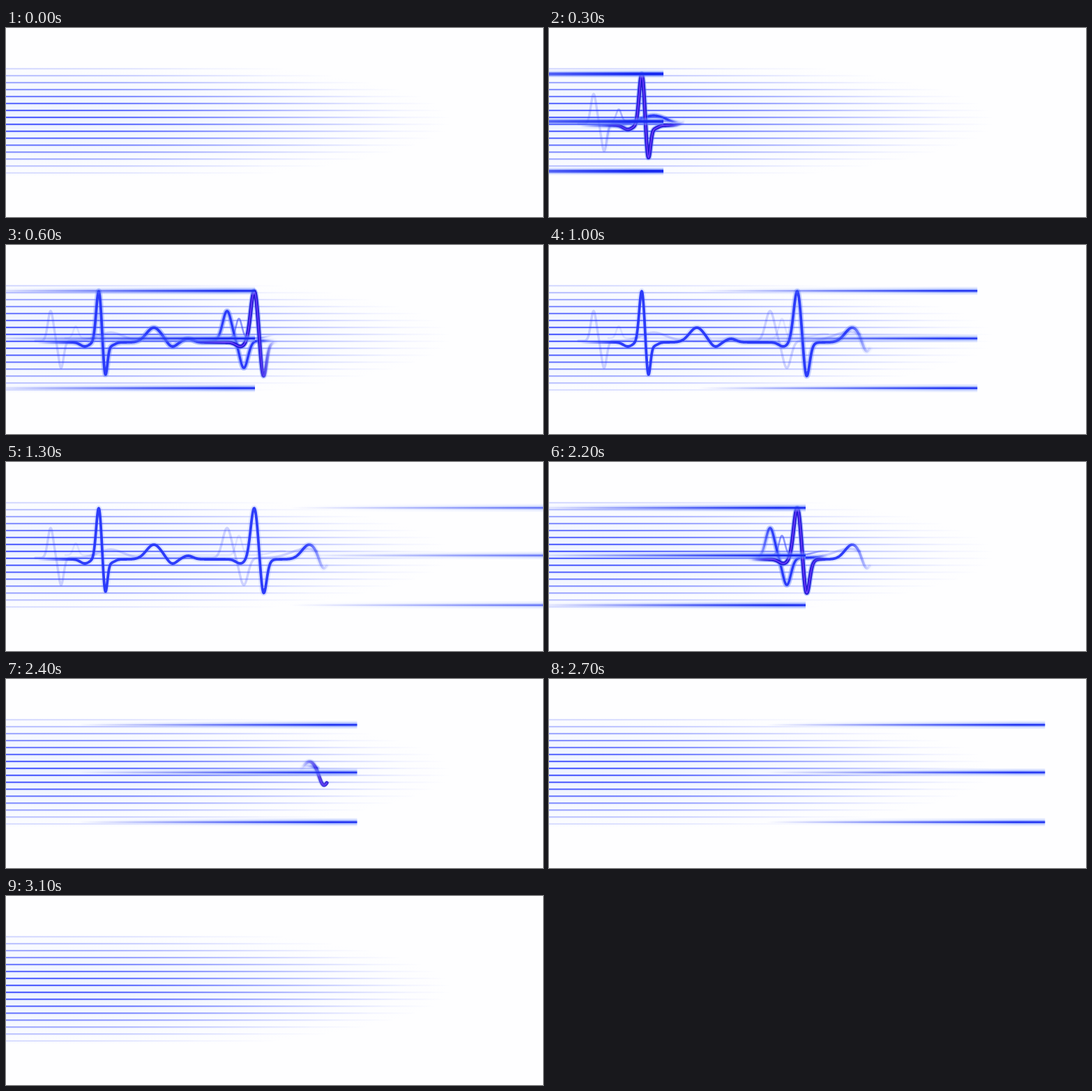
These frames come from a looping animation (770x272 px, 3200 ms). An HTML page with a canvas:

```html
<!DOCTYPE html>
<html lang="en">
<head>
<meta charset="utf-8">
<title>Pulse trace</title>
<style>
  html, body { margin: 0; width: 100%; height: 100%; overflow: hidden; background: #fefeff; }
  canvas { display: block; width: 770px; height: 272px; }
</style>
</head>
<body>
<canvas id="stage" width="770" height="272"></canvas>
<script>
const W = 770, H = 272, LOOP = 3200, STEP = 100, HALF = 16;
const ctx = document.getElementById('stage').getContext('2d');
const clamp = (v, lo = 0, hi = 1) => Math.min(hi, Math.max(lo, v));
const ramp = (v, a, b) => clamp((v - a) / (b - a));
const rgba = (rgb, a) => `rgba(${rgb},${a.toFixed(3)})`;

const BLUE = '36,52,250', GLOW = '90,120,255', HAZE = '150,175,255';
const DEEP = '24,14,205', VIOLET = '112,62,255';

// A bump is a bell curve; negative heights point up.
const bump = (at, height, width) => x => height * Math.exp(-(((x - at) / width) ** 2));

// One heartbeat: small dip, spike, deep dip, recovery, broad wave.
const beat = (at, spread) => [
  bump(at - 20, 6, 9),
  bump(at, -74, 5.2 * spread),
  bump(at + 9.3 * spread, 47, 4.3 * spread),
  bump(at + 17, 5, 8),
  bump(at + 79, -21, 15)
];
const swing = (at, spread) => [
  bump(at, -43, 5.6 * spread),
  bump(at + 15 * spread, 39, 5.2 * spread)
];

function wave(from, to, base, bumps) {
  const path = new Path2D();
  for (let x = from; x <= to; x += 0.5) {
    path.lineTo(x, bumps.reduce((y, f) => y + f(x), base));
  }
  return path;
}

const mainWave = wave(45, 460, 140, [
  ...beat(133, 1), bump(238, 7, 9), bump(261, -5, 10), ...beat(356, 1.4), bump(455, 16, 8)
]);
const echoWave = wave(42, 446, 138, [
  ...swing(64, 1), bump(150, -12, 25), ...swing(317, 1.6), bump(430, -13, 30)
]);
const smallWave = wave(85, 400, 134, [bump(100, -17, 5), bump(334, -28, 6), bump(395, -6, 20)]);

// Horizontal gradient whose alpha is a function of x.
function fade(rgb, alphaAt) {
  const g = ctx.createLinearGradient(0, 0, W, 0);
  for (let x = 0; x <= W; x += 5) g.addColorStop(x / W, rgba(rgb, alphaAt(x)));
  return g;
}

function trace(path, width, rgb, alphaAt) {
  ctx.lineWidth = width;
  ctx.strokeStyle = fade(rgb, alphaAt);
  ctx.stroke(path);
}

// Ruled lines under an elliptical falloff centred on the left edge.
function drawGrid() {
  const mid = 133, squash = 0.15, reach = 640;
  const radial = (rgb, peak) => {
    const g = ctx.createRadialGradient(0, 0, 0, 0, 0, reach);
    for (let r = 0; r <= 1; r += 0.1) {
      g.addColorStop(r, rgba(rgb, peak * Math.max(0, Math.cos(r * Math.PI / 2)) ** 1.6));
    }
    g.addColorStop(1, rgba(rgb, 0));
    return g;
  };
  const core = radial('36,50,255', 1), halo = radial('110,140,255', 0.3);
  const bar = (y, h, style) => {
    ctx.fillStyle = style;
    ctx.fillRect(0, (y - mid) / squash, reach, h / squash);
  };
  ctx.save();
  ctx.setTransform(1, 0, 0, squash, 0, mid);
  bar(57, 156, radial('190,210,255', 0.24));
  for (let y = 58; y <= 208; y += 10) {
    bar(y - 1, 3.4, halo);
    bar(y - 0.1, 1.4, core);
  }
  ctx.restore();
}

function drawWaves(tip, erasing) {
  const shown = x => erasing ? ramp(x, tip - 80, tip - 55) : 1 - ramp(x, tip + 5, tip + 30);
  const past = x => 1 - ramp(x, tip + 8, tip + 30);
  const lit = x => ramp(x, tip - 85, tip - 45) * past(x);
  const warm = x => ramp(x, tip - 480, tip - 60) * past(x);
  const ends = x => ramp(x, 45, 95) * (1 - 0.9 * ramp(x, 428, 460));
  const glow = k => x => k * shown(x) * lit(x);
  const mixed = (rest, gain) => x => shown(x) * (rest + gain * lit(x));

  trace(smallWave, 2.6, BLUE, mixed(0.1, 0.4));
  trace(echoWave, 7.5, GLOW, glow(0.45));
  trace(echoWave, 3.4, BLUE, mixed(0.2, 0.75));
  trace(mainWave, 8, GLOW, x => shown(x) * ends(x) * (0.16 + 0.34 * warm(x)));
  trace(mainWave, 3.8, BLUE, x => shown(x) * ends(x) * 0.95);
  trace(mainWave, 5.2, DEEP, glow(0.85));
  trace(mainWave, 1.8, VIOLET, glow(0.9));
}

function drawBeams(tip, strength) {
  const near = 1 - ramp(tip, 40, 600);
  const tail = (rgb, peak, power) =>
    fade(rgb, x => strength * peak * ramp(Math.min(x, tip), tip - 400, tip - 40) ** power);
  const core = tail('26,44,240', 1, 1);
  const halo = tail(GLOW, 0.5, 1.3);
  const haze = tail(HAZE, 0.28, 1.6);
  for (const y of [66, 134.5, 206]) {
    const bar = (h, style) => {
      ctx.fillStyle = style;
      ctx.fillRect(0, y - h / 2, Math.min(tip, W), h);
    };
    bar(11, haze);
    bar(6 + 2 * near, halo);
    bar(2.2 + 3 * near * near, core);
  }
}

// Beam tip after n steps of a sweep; the erasing sweep speeds up slightly.
function beamTip(n, erasing) {
  const d = n - 6;
  return erasing ? 368 + d * (67.1 + 0.31 * d) : 357 + 64.3 * d;
}

function draw(time) {
  const step = Math.floor((time % LOOP) / STEP);
  const erasing = step > HALF;
  const n = erasing ? step - HALF : step;
  const tip = beamTip(n, erasing);
  ctx.fillStyle = '#fefeff';
  ctx.fillRect(0, 0, W, H);
  ctx.lineCap = ctx.lineJoin = 'round';
  drawGrid();
  if (step === 0) return;
  drawWaves(tip, erasing);
  drawBeams(tip, 1 - ramp(tip, 760, 870));
}

const start = performance.now();
function tick() {
  draw(performance.now() - start);
  requestAnimationFrame(tick);
}
tick();
</script>
</body>
</html>
```
